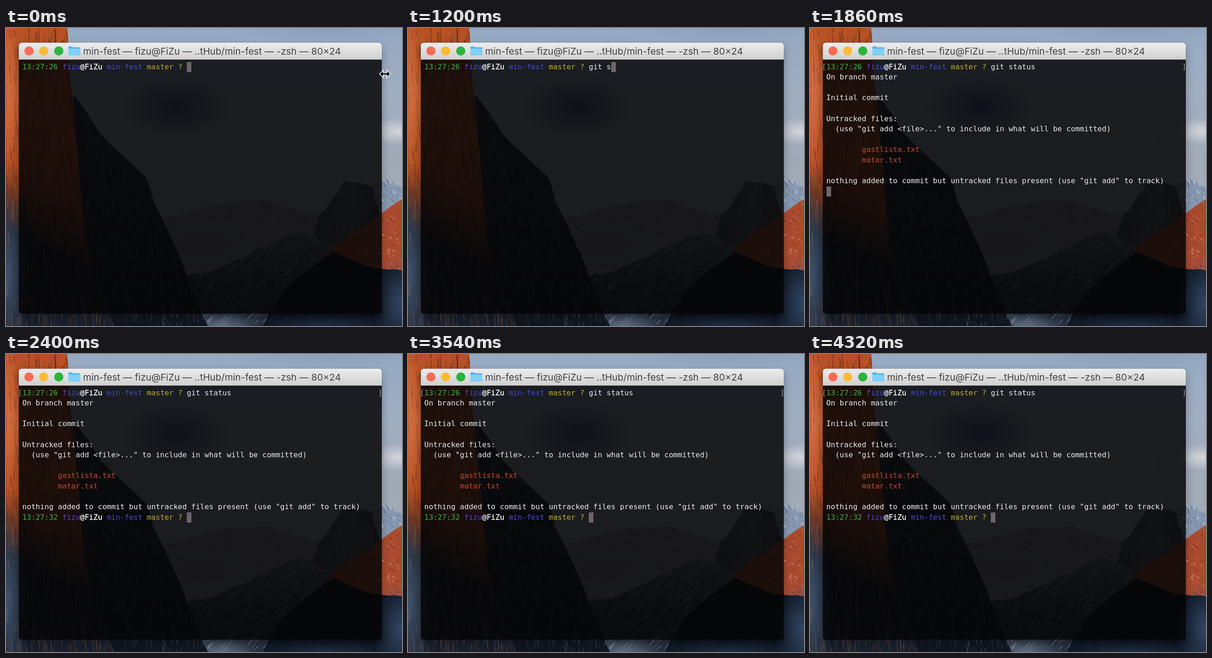
Recreate the animation shown at these times as an HTML page with a canvas. Size 863 px wide and 649 px high, loop 4.38 s.

```html
<!DOCTYPE html>
<html lang="en">
<head>
<meta charset="utf-8">
<title>Terminal</title>
<style>
html, body { margin: 0; width: 100%; height: 100%; overflow: hidden; background: #1a2230; }
#stage { position: relative; width: 863px; height: 649px; overflow: hidden; }
canvas, #shade, #window, #bar, #bar *, #term, #mouse { position: absolute; }
canvas { left: 0; top: 0; }
#window, #shade { left: 28px; top: 32px; width: 791px; height: 590px; border-radius: 6px 6px 5px 5px; }
#window { overflow: hidden; background: rgba(4, 4, 5, .85); }
#shade { box-shadow: 0 8px 18px rgba(0, 0, 0, .3), 0 0 1px rgba(0, 0, 0, .7); }
#bar { left: 0; top: 0; width: 100%; height: 36px; background: linear-gradient(#ededed, #d0d0d0); border-bottom: 1px solid #a9a9a9; }
#bar i { top: 8px; width: 20px; height: 20px; border-radius: 50%; }
#bar svg { left: 108px; top: 7px; }
#bar span { left: 140px; top: 0; font: 20.5px/37px Inter, sans-serif; color: #434343; white-space: pre; }
#term { left: 7.5px; top: 41.6px; margin: 0; font: 16.1px/22.6px "DejaVu Sans Mono", monospace; color: #ececec; }
#term u { position: absolute; top: 0; color: #999; text-decoration: none; }
#term s { display: inline-block; width: 10px; height: 22.6px; vertical-align: top; background: #6d646c; }
#term b { font-weight: 400; }
.g { color: #36b53b; } .b { color: #4c49cf; } .y { color: #bdac38; } .r { color: #c8482f; }
.w { color: #fff; -webkit-text-stroke: .3px #fff; }
#mouse { left: 812px; top: 89px; }
</style>
</head>
<body>
<div id="stage">
  <canvas id="scene" width="863" height="649"></canvas>
  <div id="shade"></div>
  <div id="window">
    <div id="bar">
      <i style="left:12px;background:#fc6b55"></i>
      <i style="left:44px;background:#fdbb35"></i>
      <i style="left:76.5px;background:#29b43d"></i>
      <svg width="26" height="22"><path d="M0 3Q0 1 2 1H8L10 3H24Q26 3 26 5V19Q26 21 24 21H2Q0 21 0 19Z" fill="#58b4e8"/><path d="M0 6H26V19Q26 21 24 21H2Q0 21 0 19Z" fill="#7fd0fa"/></svg>
      <span>min-fest — fizu@FiZu — ..tHub/min-fest — -zsh — 80×24</span>
    </div>
    <pre id="term"></pre>
  </div>
  <svg id="mouse" width="28" height="22"><path d="M2 11L10 3V8.5H18V3L26 11L18 19V13.5H10V19Z" fill="#111" stroke="#fff" stroke-width="1.6"/></svg>
</div>
<script>
const ctx = document.getElementById('scene').getContext('2d');
const W = 863, H = 649;

let seed = 7;
const rnd = () => (seed = (seed * 16807) % 2147483647) / 2147483647;

// Linear gradient with evenly spaced colours.
function fade(x0, y0, x1, y1, ...colours) {
  const g = ctx.createLinearGradient(x0, y0, x1, y1);
  colours.forEach((c, i) => g.addColorStop(i / (colours.length - 1), c));
  return g;
}

// Soft elliptical glow; rgb is a "r,g,b" string.
function cloud(x, y, rx, ry, rgb, alpha) {
  const g = ctx.createRadialGradient(0, 0, 0, 0, 0, 1);
  g.addColorStop(0, `rgba(${rgb},${alpha})`);
  g.addColorStop(1, `rgba(${rgb},0)`);
  ctx.save();
  ctx.translate(x, y);
  ctx.scale(rx, ry);
  ctx.fillStyle = g;
  ctx.fillRect(-1, -1, 2, 2);
  ctx.restore();
}

// Splits a line at displaced midpoints until its pieces are short.
function breakLine(path, a, b, rough) {
  const len = Math.hypot(b[0] - a[0], b[1] - a[1]);
  if (len < 6) return path.lineTo(...b);
  const mid = a.map((v, i) => (v + b[i]) / 2 + (rnd() - .5) * len * rough);
  breakLine(path, a, mid, rough);
  breakLine(path, mid, b, rough);
}

// A mountain: everything below a broken skyline, textured with strokes along `dir`.
function mountain(keys, fill, light, dark, dir, { alpha = .4, rough = .1, bias = 1.3 } = {}) {
  const xs = keys.map(k => k[0]), top = Math.min(...keys.map(k => k[1]));
  const left = Math.min(...xs), width = Math.max(...xs) - left, height = H - top;
  const path = new Path2D();
  path.moveTo(xs[0], H);
  path.lineTo(...keys[0]);
  keys.slice(1).forEach((k, i) => breakLine(path, keys[i], k, rough));
  path.lineTo(xs[xs.length - 1], H);

  ctx.save();
  ctx.fillStyle = fill;
  ctx.fill(path);
  ctx.clip(path);
  for (let n = width * height / 90; n > 0; n--) {
    const x = left + rnd() * width, y = top + rnd() ** bias * height, len = .2 + rnd();
    ctx.globalAlpha = alpha * (.3 + .7 * rnd());
    ctx.strokeStyle = rnd() < .5 ? light : dark;
    ctx.lineWidth = .5 + 2 * rnd();
    ctx.beginPath();
    ctx.moveTo(x, y);
    ctx.lineTo(x + dir[0] * len + rnd() * 4 - 2, y + dir[1] * len);
    ctx.stroke();
  }
  ctx.restore();
}

function paintScene() {
  ctx.fillStyle = fade(0, 0, 0, 430, '#95a9c3', '#a0aec1', '#a0aab7', '#a3aab5');
  ctx.fillRect(0, 0, W, H);
  cloud(370, 172, 120, 70, '45,65,110', .7);
  cloud(660, 235, 130, 50, '185,175,165', .55);
  cloud(855, 225, 60, 30, '245,240,238', .6);
  cloud(700, 5, 220, 25, '125,145,175', .4);

  // Snow range, valley mist and far peaks
  mountain([[325, 418], [450, 385], [575, 375], [700, 410]], '#8b8d98', '#c4c7d0', '#5d6470', [14, 9]);
  cloud(430, 470, 130, 55, '135,135,147', .8);
  mountain([[790, 350], [825, 327], [863, 349]], '#8799b1', '#e7edf5', '#4e617c', [6, 9], { alpha: .7 });

  mountain([[665, 490], [680, 412], [738, 333], [798, 345], [825, 430]],
    fade(680, 0, 825, 0, '#4a505c', '#5d6470', '#3c424e'), '#7d8490', '#20252e', [2, 22]);
  mountain([[388, 540], [520, 500], [640, 445], [740, 485]],
    fade(0, 445, 0, H, '#727885', '#363c48', '#222c3c'), '#a7adb9', '#1a1f29', [-16, 18], { alpha: .55 });
  cloud(470, H, 85, 32, '140,160,185', .6);

  // Red slope above the dark forest
  mountain([[706, 484], [780, 432], [863, 373]], '#aa4a2f', '#e9a68a', '#571d17', [5, 5], { alpha: .6 });
  mountain([[560, H], [592, 592], [710, 488], [800, 523], [863, 528]], '#0c121d', '#25344a', '#080d15', [-7, 10]);
  cloud(W, 600, 65, 110, '70,100,140', .65);
  cloud(700, H, 180, 30, '50,70,100', .5);

  // Dark central wall, then the sunlit cliff falling into shadow
  mountain([[146, 145], [205, 230], [305, 325], [347, 428], [397, 550], [440, H]],
    fade(0, 150, 0, H, '#2a303a', '#222832', '#101620'), '#7b8593', '#080b10', [3, 24], { alpha: .35, rough: .06 });
  mountain([[0, -8], [133, -8], [147, 180], [170, 450], [235, H]],
    fade(0, 0, -299, 578, '#b95023', '#c45c2c', '#b04a1d', '#1b222e', '#18202d', '#1a2433'),
    '#a06a4c', '#1c0e0b', [2, 40], { alpha: .38, rough: .03, bias: 1 });
  cloud(0, 540, 55, 190, '85,110,142', .65);
  cloud(5, 140, 28, 220, '225,125,75', .55);
}

const span = (cls, text) => `<b class="${cls}">${text}</b>`;
const caret = '<s></s>';
const prompt = time =>
  `${span('g', time)} ${span('b', 'fizu')}${span('w', '@FiZu')} ${span('b', 'min-fest')} ${span('y', 'master ?')} `;
const command = 'git status';
const output = `
On branch master

Initial commit

Untracked files:
  (use "git add &lt;file&gt;..." to include in what will be committed)

        ${span('r', 'gastlista.txt')}
        ${span('r', 'matar.txt')}

nothing added to commit but untracked files present (use "git add" to track)
`;
const brackets = '<u style="left:-1ch">[</u><u style="left:80ch">]</u>';

const LOOP = 4380, STEP = 60, TYPE = 660, PER_KEY = 105, RUN = 1800, DONE = 1980, MOUSE_OUT = 300;
const term = document.getElementById('term');
const mouse = document.getElementById('mouse');

function screenAt(t) {
  const first = prompt('13:27:26');
  if (t < RUN) {
    const keys = Math.max(0, Math.floor((t - TYPE) / PER_KEY));
    return first + command.slice(0, keys) + caret;
  }
  return brackets + first + command + output + (t < DONE ? '' : prompt('13:27:32')) + caret;
}

let shown = '';
function tick() {
  const t = Math.floor((performance.now() - start) % LOOP / STEP) * STEP;
  const html = screenAt(t);
  if (html !== shown) term.innerHTML = shown = html;
  mouse.style.visibility = t < MOUSE_OUT ? 'visible' : 'hidden';
  requestAnimationFrame(tick);
}

paintScene();
const start = performance.now();
tick();
</script>
</body>
</html>
```
